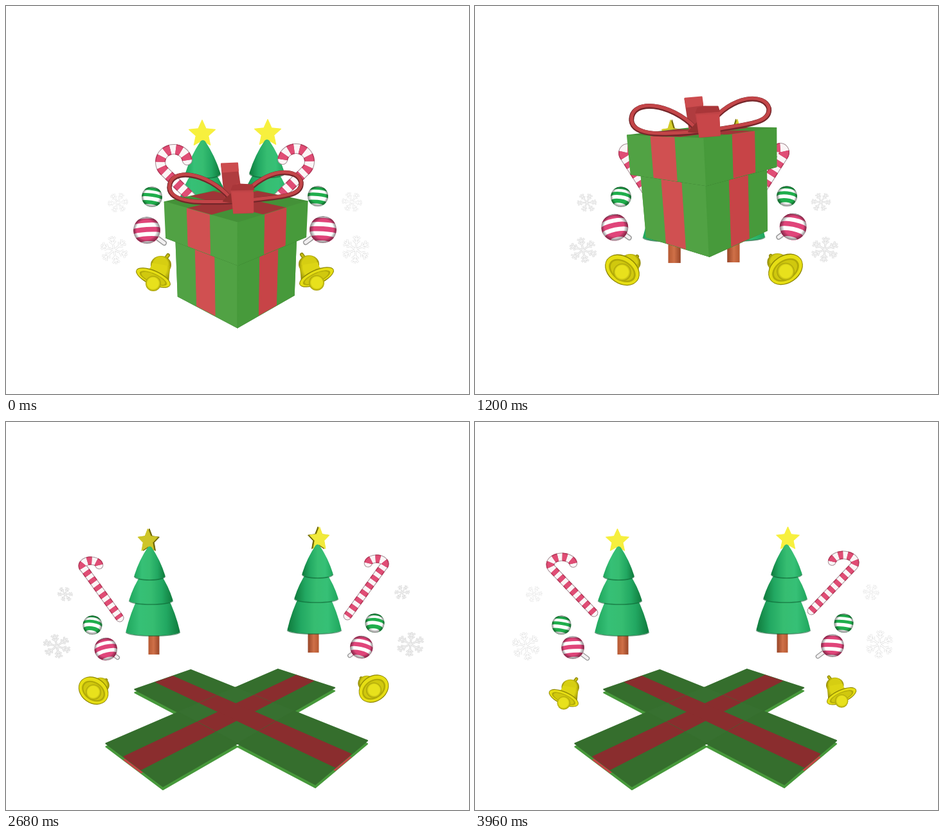
Write an HTML page with a canvas that moves like this. It is 720 by 604 pixels and loops after 4 s.

```html
<!DOCTYPE html>
<html lang="en">
<head>
<meta charset="utf-8">
<title>Gift box</title>
<style>
html, body { margin: 0; width: 100%; height: 100%; overflow: hidden; background: #fff; }
canvas { display: block; }
</style>
</head>
<body>
<canvas id="stage" width="720" height="604"></canvas>
<script>
const ctx = document.getElementById('stage').getContext('2d');
const LOOP = 4000, STEP = 40, TAU = Math.PI * 2;

const mix = (a, b, u) => a + (b - a) * u;
const mixAll = (a, b, u) => a.map((v, i) => mix(v, b[i], u));
const clamp = u => Math.max(0, Math.min(1, u));
const span = (t, a, b) => clamp((t - a) / (b - a));
const smooth = u => (1 - Math.cos(Math.PI * u)) / 2;
const rgb = c => `rgb(${c.map(Math.round).join()})`;
const tint = (a, b, u) => rgb(mixAll(a, b, u));

// Smoothly interpolates rows of [time, ...values].
function track(rows, t) {
  const i = Math.max(1, rows.findIndex(r => r[0] >= t));
  const [a, b] = [rows[i - 1], rows[i]];
  return mixAll(a, b, smooth(span(t, a[0], b[0]))).slice(1);
}

const SWING = [[0, 0], [500, 1], [1000, 0], [1450, 1], [1850, 0],
  [2400, 1], [2950, 0], [3450, .9], [4000, 0]];
const BOB = [[0, 0], [480, 1], [1130, .55], [1800, 1], [2300, .2], [3440, 1], [4000, 0]];
// centre x, y, hook radii, end x, y
const CANE = [
  [0, 261, 243, 21, 20, 300, 310], [480, 246, 225, 19, 17, 285, 290],
  [1200, 237, 229, 6, 7, 275, 300], [1800, 249, 238, 14, 14, 308, 315],
  [1900, 249, 238, 14, 14, 308, 315], [2400, 132, 224, 13, 9, 178, 305],
  [2680, 132, 224, 13, 8, 177, 305], [3440, 137, 223, 16, 11, 180, 302],
  [4000, 135, 222, 18, 12, 185, 297]];
// start, end, height, lean
const HOPS = [[0, 500, 95, 0], [520, 1040, 138, .04], [1060, 1560, 126, -.06]];

function poly(points, fill, width = 2) {
  ctx.beginPath();
  points.forEach(p => ctx.lineTo(...p));
  ctx.closePath();
  ctx.fillStyle = ctx.strokeStyle = fill;
  ctx.lineWidth = width;
  ctx.lineJoin = 'round';
  ctx.fill();
  ctx.stroke();
}
function oval(x, y, rx, ry, fill, turn = 0) {
  ctx.beginPath();
  ctx.ellipse(x, y, rx, ry, turn, 0, TAU);
  ctx.fillStyle = fill;
  ctx.fill();
}
function line(color, width, path, cap = 'round') {
  ctx.strokeStyle = color;
  ctx.lineWidth = width;
  ctx.lineCap = cap;
  ctx.stroke(path);
}
function glow(x, y, r, inner, outer) {
  const g = ctx.createRadialGradient(x - r * .1, y - r * .1, r * .3, x, y, r);
  g.addColorStop(0, inner);
  g.addColorStop(.6, inner);
  g.addColorStop(1, outer);
  return g;
}
function within(x, y, scale, draw) {
  ctx.save();
  ctx.translate(x, y);
  ctx.scale(scale, scale);
  draw();
  ctx.restore();
}

/* ---- box, in perspective ---- */
const YAW = .02, COS = .97, SIN = .243, FOCUS = 627;
function project([x0, y, z0]) {
  const x = x0 * Math.cos(YAW) + z0 * Math.sin(YAW);
  const z = z0 * Math.cos(YAW) - x0 * Math.sin(YAW);
  const d = 1 - (z * COS + y * SIN) / FOCUS;
  return [358 + x / d, 302 + (149 - COS * y + SIN * z) / d];
}
const ring = (r, y) => [[-r, y, 0], [0, y, r], [r, y, 0], [0, y, -r]];

// Panel a-b (one edge) to d-c (the opposite edge), with a ribbon down its middle.
function panel([a, b, c, d], green, red, across) {
  const strip = (a, b, c, d) => poly([mixAll(a, b, .345), mixAll(a, b, .655),
    mixAll(d, c, .655), mixAll(d, c, .345)].map(project), red, 1);
  poly([a, b, c, d].map(project), green);
  strip(a, b, c, d);
  if (across) strip(b, c, d, a);
}
const GREEN = ['#51a244', '#479a3b'], RED = ['#d05051', '#c74447'];

function flap(i, fold, lift) {
  const base = ring(90, lift), a = base[i], b = base[(i + 1) % 4];
  const out = [a[0] + b[0], 0, a[2] + b[2]].map(v => v / 127.3);
  const h = mix(125, 122, fold), angle = fold * Math.PI / 2;
  const rise = p => [p[0] + out[0] * h * Math.sin(angle),
    p[1] + h * Math.cos(angle), p[2] + out[2] * h * Math.sin(angle)];
  const quad = [a, b, rise(b), rise(a)];
  const [p, q, r] = quad.map(project);
  const outside = (q[0] - p[0]) * (r[1] - p[1]) - (q[1] - p[1]) * (r[0] - p[0]) < 0;
  if (outside) return panel(quad, GREEN[i % 2], RED[i % 2]);
  if (fold > .3) {
    ctx.save();
    ctx.translate(0, 5 * fold);
    panel(quad, '#47993b', '#c74447');
    ctx.restore();
  }
  const wall = i === 2 ? [88, 158, 73] : [104, 172, 88];
  panel(quad, tint(wall, [53, 110, 45], fold), tint([186, 60, 62], [138, 45, 46], fold));
}
function body(fold, lift) {
  [2, 3].forEach(i => flap(i, fold, lift));
  panel(ring(90, lift), '#377030', '#8a2d2e', true);
  [0, 1].forEach(i => flap(i, fold, lift));
}

const LOOPS = ['M-10-6C-45-46-103-54-104-22C-103 4-50 2-6 0',
  'M12-10C48-54 96-52 101-30C103-5 60-8 10 0'].map(d => new Path2D(d));
function bow(y) {
  const at = (z, draw) => within(...project([0, y, z]), 1 + (y - 151) / 2200, draw);
  at(-50, () => {
    poly([[-22, -46], [2, -47], [9, 2], [-17, 4]], '#b03c3f');
    poly([[-22, -47], [3, -48], [4, -36], [-20, -34]], '#cc4c4e');
  });
  at(0, () => {
    for (const loop of LOOPS) {
      line('#74262a', 7.5, loop);
      ctx.save();
      ctx.translate(0, -1);
      line('#c34548', 5, loop);
      ctx.restore();
    }
    poly([[-20, -1], [-2, -18], [22, -15], [18, 4]], '#93302f');
  });
  at(52, () => {
    poly([[-9, -33], [0, -42], [24, -40], [25, 2], [-5, 3]], '#c04346');
    poly([[-9, -33], [-6, -40], [4, -42], [24, -41], [26, -34]], '#a93639');
    poly([[-7, -29], [25, -29], [25, 1], [-5, 2]], '#c84649');
  });
}
function lid(lift) {
  const low = ring(104.5, 96 + lift), top = ring(104.5, 151 + lift);
  poly(low.map(project), '#2c6124');
  panel(top, '#449138', '#a03537', true);
  [0, 1].forEach(i => panel([low[i], low[i + 1], top[i + 1], top[i]], GREEN[i], RED[i]));
  bow(151 + lift);
}

/* ---- ornaments, drawn for the left side ---- */
function star(swing, far, right) {
  const points = [...Array(10).keys()].map(i => {
    const r = i % 2 ? 9 : 19, a = i * TAU / 10 - Math.PI / 2;
    return [r * Math.cos(a), r * Math.sin(a)];
  });
  const width = 1 - swing * mix(.82, .3, far);
  const shade = swing * (right ? 1 - far * .85 : 1);
  const place = dx => points.map(([x, y]) => [x * width + dx, y]);
  if (swing > .05) poly(place(3 * swing), '#716a05', 1);
  poly(place(-2 * swing), tint([247, 240, 62], [163, 152, 16], shade), 1);
}
function tree(slant) {
  const shaded = (half, stops) => {
    const g = ctx.createLinearGradient(-half, 0, half, 0);
    stops.forEach((c, i) => g.addColorStop(i / (stops.length - 1), c));
    return g;
  };
  const leaf = ['#1fa65d', '#36c076', '#36bd71', '#22a862', '#0f7a3c'];
  // centre, top, bottom, half widths
  const tiers = [[7, 88, 142, 23, 42], [4, 52, 93, 15, 34], [2, 10, 55, 3, 24]];
  ctx.save();
  ctx.translate(8 * slant, 0);
  ctx.fillStyle = shaded(9, ['#b2562f', '#cf7048', '#974527']);
  ctx.fillRect(-8, 140, 17, 37);
  ctx.restore();
  for (const [cx, y0, y1, w0, w1] of tiers) {
    ctx.save();
    ctx.translate(cx * slant, 0);
    ctx.beginPath();
    ctx.moveTo(-w0, y0);
    ctx.quadraticCurveTo(0, y0 - 3, w0, y0);
    ctx.quadraticCurveTo(mix(w0, w1, .65), mix(y0, y1, .45), w1, y1 - 1);
    ctx.bezierCurveTo(w1 + 1, y1 + 8, -w1 - 1, y1 + 8, -w1, y1 - 1);
    ctx.quadraticCurveTo(-mix(w0, w1, .65), mix(y0, y1, .45), -w0, y0);
    ctx.fillStyle = shaded(w1, leaf);
    ctx.fill();
    ctx.strokeStyle = 'rgba(10,90,45,.6)';
    ctx.lineWidth = 1.5;
    ctx.beginPath();
    ctx.moveTo(-w1, y1);
    ctx.bezierCurveTo(-w1, y1 + 8, w1, y1 + 8, w1, y1);
    ctx.stroke();
    ctx.restore();
  }
}
function cane([cx, cy, rx, ry, ex, ey], far) {
  const path = new Path2D();
  path.ellipse(cx, cy, rx, ry, 0, -.15, Math.PI * .78, true);
  path.lineTo(ex, ey);
  const w = mix(16, 13, far);
  line('#a58e95', w, path);
  line('#fbf5f6', w - 2, path);
  ctx.setLineDash([w * .54, w * .54]);
  line('#b9385a', w, path, 'butt');
  line('#e04d75', w - 3, path, 'butt');
  ctx.setLineDash([]);
}
function flake(r, swing, turn) {
  const path = new Path2D();
  for (let i = 0; i < 6; i++) {
    const a = i * TAU / 6 + .3;
    const spot = (d, s) => [r * (d * Math.cos(a) - s * Math.sin(a)), r * (d * Math.sin(a) + s * Math.cos(a))];
    path.moveTo(0, 0);
    path.lineTo(...spot(1, 0));
    for (const [d, s] of [[.45, .22], [.7, .25]]) {
      path.moveTo(...spot(d + .2, s));
      path.lineTo(...spot(d, 0));
      path.lineTo(...spot(d + .2, -s));
    }
  }
  ctx.save();
  ctx.rotate(turn);
  ctx.scale(1, 1 - .62 * swing);
  line(tint([220, 220, 220], [160, 160, 160], swing), r * .14, path, 'butt');
  line(tint([255, 255, 255], [190, 190, 190], swing), r * .08, path, 'butt');
  ctx.restore();
}
// Striped sphere: its axis tips towards the viewer by `tip` and rolls by `roll`.
function stripes(r, color, cuts, tip, roll) {
  ctx.save();
  ctx.rotate(roll);
  ctx.beginPath();
  ctx.arc(0, 0, r, 0, TAU);
  ctx.clip();
  oval(0, 0, r, r, '#fff');
  cuts.forEach((s, i) => {
    const fill = i % 2 ? '#fff' : color, w = r * Math.sqrt(1 - s * s);
    oval(0, s * r * Math.cos(tip), w, w * Math.sin(tip), fill);
    ctx.fillRect(-r, s * r / Math.cos(tip), 2 * r, 2 * r);
  });
  ctx.rotate(-roll);
  oval(0, 0, r, r, glow(0, 0, r, 'rgba(0,0,0,0)', 'rgba(20,10,15,.5)'));
  ctx.restore();
}
function lolly(swing) {
  const stick = new Path2D(`M0 0L${27 - 11 * swing} ${20 - 9 * swing}`);
  line('#9a9a9a', 8, stick);
  line('#f2f0f1', 5, stick);
  stripes(21, '#e0457a', [-.8, -.45, -.12, .25, .55, .88], .12 + .3 * swing, -.06 - .35 * swing);
}
function bell(swing) {
  const rimY = mix(7, -13, swing), flat = mix(10, 27, swing);
  const dome = [mix(12, 13, swing), mix(-13, -18, swing)];
  const grip = new Path2D(`M${dome[0]} ${dome[1]}L23 ${mix(-28, -25, swing)}`);
  line('#8f8806', 6, grip);
  line('#c9c010', 3, grip);
  oval(...dome, 16, 14, glow(...dome, 16, '#d6ce12', '#898204'));
  ctx.beginPath();
  ctx.moveTo(dome[0] - 14, dome[1] - 3);
  ctx.quadraticCurveTo(-5, mix(0, -14, swing), -24, rimY - 8);
  ctx.lineTo(24, rimY + 10);
  ctx.quadraticCurveTo(25, mix(-2, -14, swing), dome[0] + 15, dome[1] + 2);
  ctx.fillStyle = glow(2, -8, 28, '#ddd514', '#8d8603');
  ctx.fill();
  const turn = .42 + .3 * swing;
  oval(0, rimY, 29, flat + 1.5, '#8e8704', turn);
  oval(0, rimY, 28, flat, '#e6de14', turn);
  oval(0, rimY + 1, 23, flat * .76, '#b2aa08', turn);
  oval(0, rimY + 1, 20, flat * .64, '#d0c80e', turn);
  const y = mix(16, -13, swing), r = mix(12, 15, swing);
  oval(0, y, r, r, glow(0, y, r, '#e8e11c', '#a59d06'));
}

function ornaments(t, right) {
  const far = smooth(span(t, 1900, 2400)), [p] = track(SWING, t), [bob] = track(BOB, t);
  const put = (near, away, scale, draw) => within(...mixAll(near, away, far), mix(1, scale, far), draw);
  ctx.save();
  if (right) {
    ctx.translate(mix(712, 708, far), mix(-1, -3, far));
    ctx.scale(-1, 1);
  }
  put([305, 199], [221.5, 185], .88, () => {
    ctx.scale(1.136, 1.136);
    star(p, far, right);
    tree(mix(.5, 1, far));
  });
  cane(track(CANE, t), far);
  put([174, 306], [92, 268], .8, () => flake(16, p * p, .65));
  put([168, 380], [79, 349], 1, () => flake(22, p * p, right ? .15 : .05));
  put([227, 297], [134.5, 316], .94, () =>
    stripes(16, '#1fae4c', [-.82, -.5, -.18, .15, .5, .82], .15 + .95 * p * p, right ? -.1 : .15));
  put([219 - 3 * bob, 349 - 8 * bob], [152 + 8 * bob, 351 + 6 * bob], .85, () => lolly(p));
  put([229, 416], [138 - 4 * p, 424], .86, () => bell(Math.sin(p * Math.PI / 2)));
  ctx.restore();
}

function render(t) {
  ctx.fillStyle = '#fff';
  ctx.fillRect(0, 0, 720, 604);
  ornaments(t, false);
  ornaments(t, true);

  let lift = 0, lean = 0;
  for (const [start, end, height, roll] of HOPS) {
    const u = span(t, start, end), arc = 4 * u * (1 - u);
    lift += height * arc;
    lean += roll * arc;
  }
  const fold = span(t, 1880, 2380) ** 2;
  const open = t > 1600 ? 112 * ((t - 1600) / 200) ** 1.6 : 0;
  ctx.save();
  ctx.translate(359, 400 - lift);
  ctx.rotate(lean);
  ctx.translate(-359, lift - 400);
  body(fold, lift);
  if (open < 420) lid(lift + open);
  ctx.restore();
}

function frame() {
  render(Math.floor(performance.now() % LOOP / STEP) * STEP);
  requestAnimationFrame(frame);
}
frame();
</script>
</body>
</html>
```
